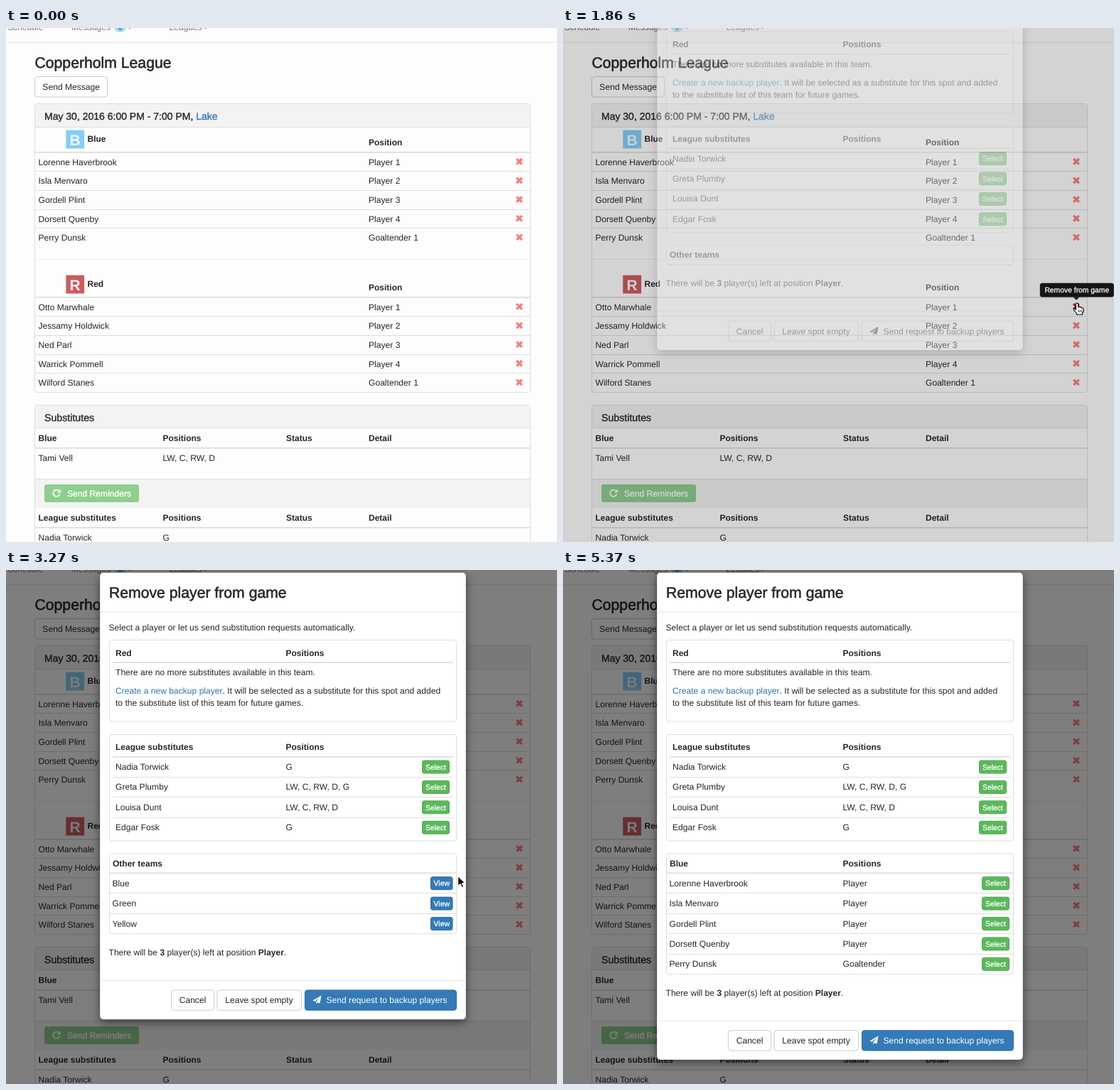
An HTML page with a canvas that plays this animation: 775x723 px, repeating every 8410 ms.

```html
<!DOCTYPE html>
<html lang="en">
<head>
<meta charset="utf-8">
<title>Remove player</title>
<style>
html, body { margin: 0; width: 100%; height: 100%; overflow: hidden; background: #fdfdfd; }
canvas { display: block; width: 775px; height: 723px; }
</style>
</head>
<body>
<canvas id="stage"></canvas>
<script>
const W = 775, H = 723, LOOP = 8410;
const INK = '#262626', LINE = '#ddd', LINK = '#2f74b3', PAPER = '#fdfdfd';
const BLUE_TEAM = ['Lorenne Haverbrook', 'Isla Menvaro', 'Gordell Plint', 'Dorsett Quenby', 'Perry Dunsk'];
const RED_TEAM = ['Otto Marwhale', 'Jessamy Holdwick', 'Ned Parl', 'Warrick Pommell', 'Wilford Stanes'];
const SPOTS = ['Player 1', 'Player 2', 'Player 3', 'Player 4', 'Goaltender 1'];
const SUBS = [['Nadia Torwick', 'G'], ['Greta Plumby', 'LW, C, RW, D, G'], ['Louisa Dunt', 'LW, C, RW, D'], ['Edgar Fosk', 'G']];
const TEAMS = ['Blue', 'Green', 'Yellow'];

const dpr = window.devicePixelRatio || 1;
const sheet = c => {
  c.width = W * dpr;
  c.height = H * dpr;
  const g = c.getContext('2d');
  g.scale(dpr, dpr);
  g.textRendering = 'geometricPrecision';
  return g;
};
const stage = sheet(document.getElementById('stage'));
const layer = sheet(document.createElement('canvas'));
let ctx = stage;

// Weight 500 is regular type thickened by a hairline stroke.
function text(s, x, y, { size = 12.1, weight = 400, color = INK, align = 'left' } = {}) {
  ctx.font = `${weight > 500 ? 'bold' : 'normal'} ${size}px "Liberation Sans", Arial, sans-serif`;
  ctx.textAlign = align;
  ctx.fillStyle = color;
  ctx.fillText(s, x, y);
  if (weight === 500) {
    ctx.strokeStyle = color;
    ctx.lineWidth = size * 0.026;
    ctx.strokeText(s, x, y);
  }
  return x + ctx.measureText(s).width;
}
const bold = (s, x, y) => text(s, x, y, { size: 12, weight: 700 });

function rect(x, y, w, h, color) {
  ctx.fillStyle = color;
  ctx.fillRect(x, y, w, h);
}
const rule = (x, x2, y, thick = 1, color = LINE) => rect(x, y, x2 - x, thick, color);

function box(x, y, x2, y2, r, fill, border) {
  ctx.beginPath();
  ctx.roundRect(x, y, x2 - x, y2 - y, r);
  if (fill) { ctx.fillStyle = fill; ctx.fill(); }
  if (border) { ctx.strokeStyle = border; ctx.lineWidth = 1; ctx.stroke(); }
}

function shape(points, color) {
  ctx.beginPath();
  for (const [x, y] of points) ctx.lineTo(x, y);
  ctx.closePath();
  ctx.fillStyle = color;
  ctx.fill();
}

function cross(x, y, color) {
  ctx.strokeStyle = color;
  ctx.lineWidth = 3.3;
  ctx.beginPath();
  for (const d of [-1, 1]) {
    ctx.moveTo(x - 3.8, y - 3.8 * d);
    ctx.lineTo(x + 3.8, y + 3.8 * d);
  }
  ctx.stroke();
}

function team(name, tint, players, y, hover) {
  rect(84.3, y - 0.3, 25.8, 25.8, tint);
  text(name[0], 97.2, y + 20.5, { size: 21, weight: 700, color: '#f3f8fc', align: 'center' });
  bold(name, 114.5, y + 16.3);
  bold('Position', 510, y + 21);
  rule(41, 737, y + 30, 1.7);
  players.forEach((p, i) => {
    const base = y + 48.8 + i * 26.65;
    text(p, 45.5, base);
    text(SPOTS[i], 510, base);
    cross(722, base - 5, hover && !i ? '#e01010' : '#fa7f7c');
    if (i < 4) rule(41, 737, Math.round(base + 8.6));
  });
}

function nav() {
  const color = '#777';
  text('Schedule', 2, 3, { color });
  text('Messages', 92, 3, { color });
  box(152, -9, 169, 6, 7.5, '#a9dcf3');
  text('0', 160.5, 2.5, { size: 10.3, weight: 700, color: '#31708f', align: 'center' });
  text('Leagues', 229.5, 3, { color });
  for (const x of [174, 280.5]) shape([[x - 3.4, -2], [x + 3.4, -2], [x, 1.5]], color);
  rule(0, W, 20, 1, '#e5e5e5');
}

function refreshIcon(x, y) {
  ctx.strokeStyle = '#fff';
  ctx.lineWidth = 1.7;
  ctx.beginPath();
  ctx.arc(x, y, 4.7, 0.25, 5.5);
  ctx.stroke();
  shape([[x + 6, y - 5.8], [x + 6, y - 0.9], [x + 1.1, y - 0.9]], '#fff');
}

function page(hover) {
  rect(0, 0, W, H, PAPER);
  nav();
  text('Copperholm League', 40.5, 56, { size: 21.2, weight: 500 });
  box(40.5, 68.5, 142.5, 97, 3.5, '#fff', '#ccc');
  text('Send Message', 91.7, 87, { align: 'center' });

  box(40.5, 106.5, 737.5, 512.5, 3.5, PAPER, LINE);
  rect(41, 107, 696, 32, '#f3f3f3');
  rule(41, 737, 139);
  const end = text('May 30, 2016 6:00 PM - 7:00 PM, ', 54, 128.5, { size: 14, weight: 500 });
  text('Lake', end, 128.5, { size: 14, weight: 500, color: LINK });
  team('Blue', '#83cdf9', BLUE_TEAM, 144, false);
  rule(41, 737, 325, 1, '#eee');
  team('Red', '#cd5c5c', RED_TEAM, 348, hover);

  box(40.5, 530.5, 737.5, 760, 3.5, PAPER, LINE);
  rect(41, 531, 696, 31, '#f3f3f3');
  rule(41, 737, 562);
  text('Substitutes', 54, 552.7, { size: 14.2, weight: 500 });
  subsHead('Blue', 581);
  text('Tami Vell', 45.5, 608.7);
  text('LW, C, RW, D', 220.5, 608.7);
  rect(41, 634, 696, 41, '#f3f3f3');
  rule(41, 737, 634);
  box(54, 642, 187, 667, 3, '#8fce8f');
  refreshIcon(71, 654.3);
  text('Send Reminders', 86, 659, { weight: 500, color: '#fff' });
  subsHead('League substitutes', 693);
  text(SUBS[0][0], 45.5, 720.5);
  text('G', 220.5, 720.5);
}

function subsHead(title, y) {
  [title, 'Positions', 'Status', 'Detail'].forEach((s, i) => bold(s, [45.5, 220.5, 394, 510][i], y));
  rule(41, 737, y + 9, 1.7);
}

function smallButton(label, x, x2, base, fill, border) {
  box(x + 0.5, base - 13, x2 - 0.5, base + 5, 2.5, fill, border);
  text(label, (x + x2) / 2, base - 0.3, { size: 10.4, weight: 500, color: '#fff', align: 'center' });
}
const selectButton = (x, base, hover) =>
  smallButton('Select', x, x + 39, base, hover ? '#449d44' : '#5cb85c', '#4cae4c');

function plane(x, y, color) {
  shape([[6, -6], [-6, 1.2], [-2.8, 2.5], [4.2, -4.2], [-1.2, 3.2], [-1.2, 6], [0.8, 3.9], [4, 5.2]]
    .map(([a, b]) => [x + a, y + b]), color);
}

function modal({ loaded, picked, rowTint, overButton }) {
  const rows = picked ? BLUE_TEAM : loaded ? TEAMS : [];
  const end = 426.5 + 28.4 * rows.length;

  ctx.save();
  ctx.shadowColor = 'rgba(0,0,0,.5)';
  ctx.shadowBlur = 13 * dpr;
  ctx.shadowOffsetY = 4 * dpr;
  box(132, 3.5, 647, end + 120.5, 5, '#fff');
  ctx.restore();
  box(132, 3.5, 647, end + 120.5, 5, null, 'rgba(0,0,0,.2)');
  text('Remove player from game', 145, 39, { size: 21.2, weight: 500 });
  rule(132.5, 646.5, 58.5, 1, '#e5e5e5');
  text('Select a player or let us send substitution requests automatically.', 144.5, 85);

  box(145.5, 98.5, 633.5, 213, 3.5, null, LINE);
  bold('Red', 154, 120.5);
  bold('Positions', 393.5, 120.5);
  rule(150, 629, 129.3, 1.7);
  text('There are no more substitutes available in this team.', 154, 148);
  const x = text('Create a new backup player', 154, 174, { color: LINK });
  text('. It will be selected as a substitute for this spot and added', x, 174);
  text('to the substitute list of this team for future games.', 154, 191.3);

  box(145.5, 231.5, 633.5, 381, 3.5, null, LINE);
  bold('League substitutes', 154, 253);
  bold('Positions', 393.5, 253);
  rule(150, 629, 262, 1.7);
  SUBS.forEach(([name, spots], i) => {
    const base = 281 + i * 28.4;
    text(name, 154, base);
    if (loaded) text(spots, 393.5, base);
    selectButton(585, base);
    if (i < 3) rule(150, 629, Math.round(base + 10));
  });

  if (rowTint) {
    ctx.save();
    ctx.globalAlpha = rowTint;
    rect(146, 427, 487, 27.5, '#f2f2f2');
    ctx.restore();
  }
  box(145.5, 398.8, 633.5, end, 3.5, null, LINE);
  bold(picked ? 'Blue' : 'Other teams', 150, 416.5);
  if (picked) bold('Positions', 393.5, 416.5);
  rule(146, 633, 425.5, rows.length ? 1.7 : 1.2);
  rows.forEach((name, i) => {
    const base = 444.7 + i * 28.4, hot = overButton && !i;
    text(name, 149.5, base);
    if (picked) {
      text(i < 4 ? 'Player' : 'Goaltender', 393.5, base);
      selectButton(589, base, hot);
    } else {
      smallButton('View', 597, 628.5, base, hot ? '#286090' : '#337ab7', hot ? '#204d74' : '#2e6da4');
    }
    if (i < rows.length - 1) rule(146, 633, Math.round(base + 9.6));
  });

  let p = text('There will be ', 144.5, end + 30.2);
  p = bold('3', p, end + 30.2);
  p = text(' player(s) left at position ', p, end + 30.2);
  p = bold('Player', p, end + 30.2);
  text('.', p, end + 30.2);

  rule(132.5, 646.5, end + 65, 1, '#e5e5e5');
  const top = end + 79.2, low = end + 107.5, base = end + 97.7;
  box(232.5, top, 292.5, low, 3.5, '#fff', '#ccc');
  text('Cancel', 262.5, base, { align: 'center' });
  box(297, top, 415.5, low, 3.5, '#fff', '#ccc');
  text('Leave spot empty', 356, base, { align: 'center' });
  const ink = loaded ? '#fff' : INK;
  box(420.5, top, 633.5, low, 3.5, loaded ? '#337ab7' : '#fff', loaded ? '#2e6da4' : '#ccc');
  plane(437.5, end + 92.7, ink);
  text('Send request to backup players', 450.5, base, { color: ink });
}

function tooltip(label, x, x2, y, tip, alpha) {
  if (alpha <= 0) return;
  const low = y + 19.7;
  ctx.save();
  ctx.globalAlpha = alpha * 0.9;
  box(x, y, x2, low, 3.5, '#000');
  shape([[tip - 4.3, low], [tip + 4.3, low], [tip, low + 4.3]], '#000');
  ctx.globalAlpha = alpha;
  text(label, (x + x2) / 2, y + 13.4, { size: 10.35, weight: 500, color: '#fff', align: 'center' });
  ctx.restore();
}

const HAND = new Path2D('M-1.6 1Q0-1 1.6 1V5.5Q3.1 4.5 4.2 6Q5.8 5.2 6.8 6.8Q9 6.4 9 9V11.5L7.5 14.5V16H-.5V14.5L-4.5 9.5Q-5 7.4-3.2 7.6L-1.6 9.2Z');
const ARROW = new Path2D('M0 0V14.5L3.4 11.4L5.6 16.5L8 15.5L5.8 10.4H10.4Z');

function cursor({ x, y, hand }) {
  ctx.save();
  ctx.translate(x, y);
  ctx.lineJoin = 'round';
  ctx.lineWidth = 1.2;
  ctx.fillStyle = hand ? '#fff' : '#000';
  ctx.strokeStyle = hand ? '#000' : '#fff';
  const path = hand ? HAND : ARROW;
  ctx.fill(path);
  ctx.stroke(path);
  if (hand) {
    ctx.lineWidth = 0.8;
    ctx.beginPath();
    for (const fx of [2, 4.2, 6.4]) {
      ctx.moveTo(fx, 9.5);
      ctx.lineTo(fx, 13);
    }
    ctx.stroke();
  }
  ctx.restore();
}

const clamp = v => Math.max(0, Math.min(1, v));
const ease = v => v * v * (3 - 2 * v);
const mix = (a, b, v) => a + (b - a) * v;
// Index of the held step at time t, -1 before the first.
const step = (t, start, gap, count) => t < start ? -1 : Math.min(count - 1, Math.floor((t - start) / gap));

function pointer(t) {
  if (t < 600 || t >= 5370) return null;
  if (t < 2670) {
    const k = step(t, 600, 160, 7), v = ease((k + 1) / 7);
    return { x: mix(771, 723, v), y: mix(394, 387, v), hand: k > 3 };
  }
  const k = step(t, 2670, 150, 7), v = ease((k + 1) / 7);
  return { x: mix(723, 614, v), y: mix(387, 441, v), hand: k > 5 };
}

function render(t) {
  ctx = stage;
  const arrive = step(t, 600, 160, 7), leave = step(t, 2670, 150, 7);
  page(arrive > 3 && leave < 0);

  if (t >= 1860) {
    const phase = t < 2010 ? 0 : t < 2190 ? 1 : 2;
    rect(0, 0, W, H, `rgba(0,0,0,${phase ? 0.5 : 0.167})`);
    ctx = layer;
    ctx.clearRect(0, 0, W, H);
    ctx.save();
    ctx.translate(0, [-93.4, -17.5, 0][phase]);
    modal({
      loaded: t >= 2370,
      picked: t >= 4770,
      rowTint: t < 3420 || t >= 5370 ? 0 : t < 5220 ? 1 : 0.5,
      overButton: t >= 3570 && t < 5220
    });
    ctx.restore();
    ctx = stage;
    ctx.save();
    ctx.globalAlpha = phase ? 1 : 0.33;
    ctx.drawImage(layer.canvas, 0, 0, W, H);
    ctx.restore();
  }

  tooltip('Remove from game', 670.8, 774.8, 358.8, 722, clamp((arrive - 3) / 3) - clamp((leave + 1) / 3));
  const shown = (step(t, 3720, 150, 3) + 1) / 3, gone = (step(t, 4620, 150, 2) + 1) / 2;
  tooltip('View team.', 580.2, 644.7, 404.2, 612.3, shown - gone);

  const p = pointer(t);
  if (p) cursor(p);
}

function tick() {
  render(performance.now() % LOOP);
  requestAnimationFrame(tick);
}
tick();
</script>
</body>
</html>
```
